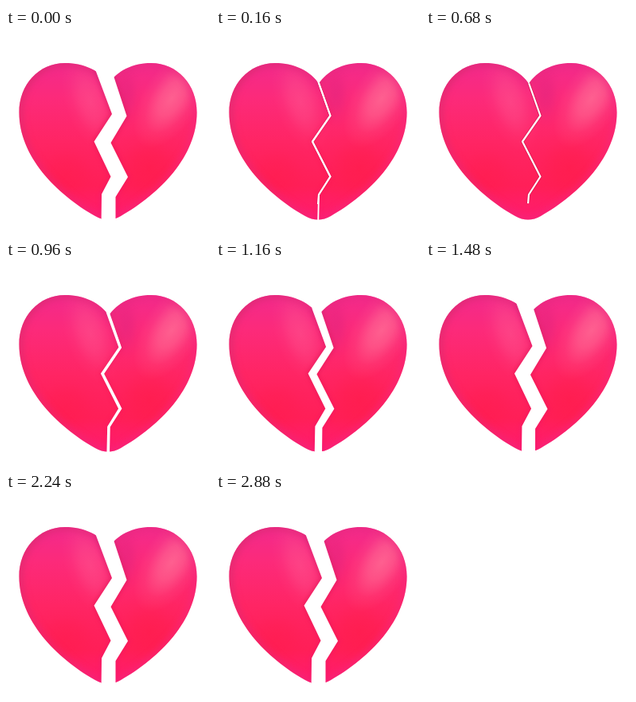
These frames come from a looping animation (256x256 px, 2.92 s). An HTML page with a canvas:

```html
<!DOCTYPE html>
<html lang="en">
<head>
<meta charset="utf-8">
<title>Broken heart</title>
<style>
html, body { margin: 0; width: 100%; height: 100%; overflow: hidden; background: #fff; }
canvas { display: block; width: 256px; height: 256px; }
</style>
</head>
<body>
<canvas id="stage" width="256" height="256"></canvas>
<script>
const ctx = document.getElementById('stage').getContext('2d');
const LOOP = 2920, STEP = 40;

const heart = new Path2D(`M129 70 C119 54 98 44 74 44 C41 44 16.5 71 16.5 106
  C16.5 161 63 208 112 236 Q128 245 144 236 C193 208 239.5 161 239.5 106
  C239.5 71 215 44 182 44 C159 44 139 54 129 70 Z`);

// Crack line, and both edges of the gap once fully open
const crack = [[129, 69], [143.5, 110], [121, 142.5], [143.5, 186.5], [129, 209], [128, 221]];
const leftEdge = [[112, 52], [133, 108], [110.5, 142.5], [131.5, 186.5], [120, 208.5], [119.5, 248]];
const rightEdge = [[132, 51], [151.5, 110.5], [131.5, 144], [153, 187], [137.5, 212], [137.5, 248]];

const clamp = v => Math.max(0, Math.min(1, v));
const span = (t, a, b) => clamp((t - a) / (b - a));
const ease = v => v * v * (3 - 2 * v);
const mix = (from, to, k) => from.map((p, i) => p.map((v, j) => v + (to[i][j] - v) * k));

function trace(points) {
  ctx.beginPath();
  points.forEach(p => ctx.lineTo(p[0], p[1]));
}

function addStops(gradient, stops) {
  stops.forEach(([at, color]) => gradient.addColorStop(at, color));
  return gradient;
}

// Soft elliptical light or shade, tilted by an angle in degrees
function glow(x, y, rx, ry, tilt, rgb, alpha) {
  ctx.save();
  ctx.translate(x, y);
  ctx.rotate(tilt * Math.PI / 180);
  ctx.scale(rx, ry);
  ctx.fillStyle = addStops(ctx.createRadialGradient(0, 0, 0, 0, 0, 1), [
    [0, `rgba(${rgb},${alpha})`], [0.35, `rgba(${rgb},${alpha * 0.72})`],
    [0.7, `rgba(${rgb},${alpha * 0.2})`], [1, `rgba(${rgb},0)`]
  ]);
  ctx.fillRect(-1, -1, 2, 2);
  ctx.restore();
}

function softStroke(style, width, blur, path) {
  ctx.save();
  ctx.filter = `blur(${blur}px)`;
  ctx.strokeStyle = style;
  ctx.lineWidth = width;
  path ? ctx.stroke(path) : ctx.stroke();
  ctx.restore();
}

function drawBody() {
  ctx.fillStyle = addStops(ctx.createLinearGradient(0, 44, 0, 241), [
    [0, '#f22a8c'], [0.22, '#fc2a7a'], [0.5, '#ff2564'], [0.78, '#ff1f58'], [1, '#ff1c70']
  ]);
  ctx.fillRect(0, 0, 256, 256);
  glow(75, 185, 50, 45, 0, '255,26,72', 0.4);
  glow(180, 175, 55, 50, 0, '255,26,68', 0.5);
  glow(150, 84, 22, 42, 0, '222,34,126', 0.5);
  glow(106, 92, 32, 66, -18, '255,90,146', 0.5);
  glow(208, 88, 36, 70, 32, '255,116,152', 0.72);
  softStroke(addStops(ctx.createLinearGradient(20, 70, 200, 220), [
    [0, 'rgba(212,42,106,.75)'], [0.35, 'rgba(228,40,122,.6)'], [1, 'rgba(246,38,126,.6)']
  ]), 8, 4, heart);
}

function edgeTone(alpha) {
  return addStops(ctx.createLinearGradient(0, 60, 0, 240), [
    [0, `rgba(214,36,116,${alpha})`], [0.5, `rgba(236,22,84,${alpha})`], [1, `rgba(246,24,110,${alpha})`]
  ]);
}

function shadeEdges(edges, open) {
  for (const edge of edges) {
    trace(edge);
    softStroke(edgeTone(0.6 * Math.min(1, open * 2)), 5, 2);
  }
}

function drawCrack(grow, fade) {
  const lengths = crack.slice(1).map((p, i) => Math.hypot(p[0] - crack[i][0], p[1] - crack[i][1]));
  const total = lengths.reduce((a, b) => a + b);
  trace(crack);
  ctx.setLineDash([total * grow, 1000]);
  ctx.strokeStyle = `rgba(206,22,74,${0.6 * fade})`;
  ctx.lineWidth = 4;
  ctx.stroke();
  ctx.strokeStyle = '#fff';
  ctx.lineWidth = 2.2;
  ctx.stroke();
  ctx.setLineDash([]);
}

function drawGap(left, right) {
  trace(left.concat(right.slice().reverse()));
  ctx.fillStyle = '#fff';
  ctx.fill();
}

function draw(t) {
  const closing = t < 200;
  const open = closing ? 1 - ease(span(t, 0, 200)) : ease(span(t, 700, 1600));
  const grow = closing ? 1 : span(t, 265, 682);
  const closed = crack.slice(0, 5).concat([[128, 248]]);
  const left = mix(closed, leftEdge, open), right = mix(closed, rightEdge, open);

  ctx.fillStyle = '#fff';
  ctx.fillRect(0, 0, 256, 256);
  ctx.lineJoin = 'round';
  ctx.save();
  ctx.clip(heart);
  drawBody();
  if (open > 0) shadeEdges([left, right], open);
  if (grow > 0 && open < 0.25) drawCrack(grow, 1 - open * 4);
  ctx.restore();
  if (open > 0) drawGap(left, right);
}

function frame(now) {
  draw(Math.floor((now % LOOP) / STEP) * STEP);
  requestAnimationFrame(frame);
}
draw(0);
requestAnimationFrame(frame);
</script>
</body>
</html>
```
